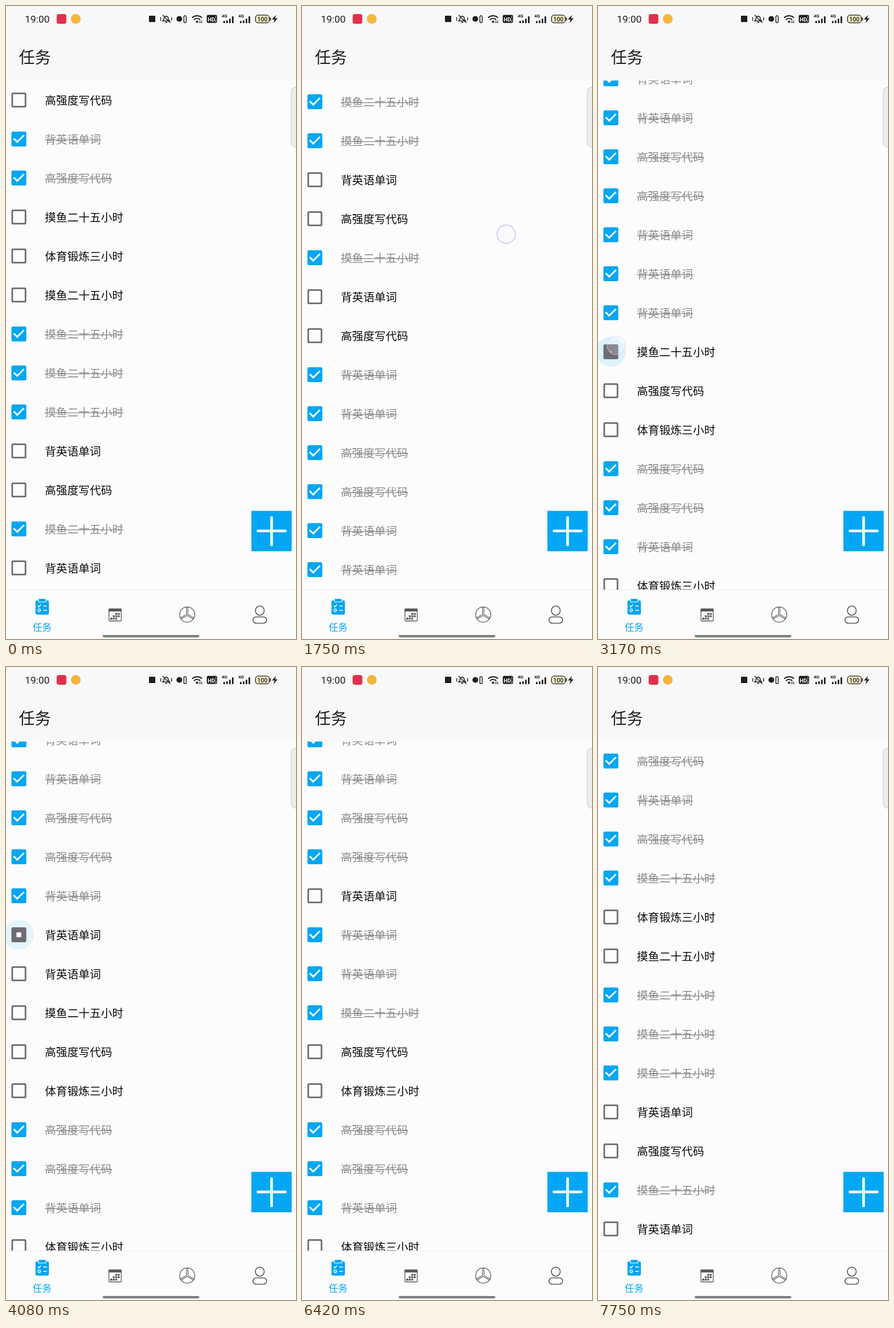
Write an HTML page with a canvas that moves like this. It is 507x1104 px and loops after 8000 ms.

```html
<!DOCTYPE html>
<html lang="zh-CN">
<head>
<meta charset="utf-8">
<style>
html, body { margin: 0; width: 100%; height: 100%; overflow: hidden; background: #fcfcfc; }
canvas { display: block; width: 507px; height: 1104px; }
</style>
</head>
<body>
<canvas id="stage"></canvas>
<script>
const W = 507, H = 1104, LOOP = 8000, STEP = LOOP / 96;
const BLUE = '#03a6f3', GRAY = '#6d6b74', INK = '#1d1d20', PAGE = '#fcfcfc', HEAD = '#f8f8f8';
const CJK = '"Noto Sans CJK SC", "Noto Sans CJK", sans-serif';
const LIST_TOP = 130, LIST_END = 1018, FIRST = 164, PITCH = 68, FAR = 989;

const canvas = document.getElementById('stage');
const ctx = canvas.getContext('2d');
const dpr = window.devicePixelRatio || 1;
canvas.width = W * dpr;
canvas.height = H * dpr;

const LABEL = { 高: '高强度写代码', 背: '背英语单词', 摸: '摸鱼二十五小时', 体: '体育锻炼三小时' };
const DONE = '0110001110010011111111001110';
const items = [...'高背高摸体摸摸摸摸背高摸背高背背高高背背背摸高体高高背体']
  .map((key, i) => ({ text: LABEL[key], done: DONE[i] === '1' }));

// Each tap: row, step at which the finger lands, finger position relative to the box
const taps = [
  [0, 1, 12, 4], [3, 6, 10, -2],
  [21, 36, 9, -11], [20, 41, 12, -4], [19, 46, 14, 2], [18, 51, 14, 4],
  [19, 61, 19, 9], [20, 66, 17, 5], [21, 71, 15, 2]
].map(([row, step, dx, dy]) => ({ row, at: step * STEP, dx, dy }));
const PRESS = STEP;

const clamp = v => Math.max(0, Math.min(1, v));

function scrollAt(t) {
  if (t < 1750) return 473 * clamp((t - 1333) / 417) ** 1.6;
  if (t < 6480) return 473 + (FAR - 473) * (1 - (1 - clamp((t - 1750) / 1150)) ** 4.2);
  if (t <= 7000) return FAR - 891 * clamp((t - 6480) / 520) ** 1.35;
  return 98 * (1 - clamp((t - 7000) / 80));
}

function box(x, y, w, h, r, fill, stroke, lw = 1) {
  ctx.beginPath();
  ctx.roundRect(x, y, w, h, r);
  if (fill) { ctx.fillStyle = fill; ctx.fill(); }
  if (stroke) { ctx.strokeStyle = stroke; ctx.lineWidth = lw; ctx.stroke(); }
}

function disc(x, y, r, fill, stroke, lw = 1) {
  ctx.beginPath();
  ctx.arc(x, y, r, 0, 7);
  if (fill) { ctx.fillStyle = fill; ctx.fill(); }
  if (stroke) { ctx.strokeStyle = stroke; ctx.lineWidth = lw; ctx.stroke(); }
}

function line(d, color, lw, cap = 'butt') {
  ctx.strokeStyle = color;
  ctx.lineWidth = lw;
  ctx.lineCap = cap;
  ctx.stroke(new Path2D(d));
}

function shape(d, color) {
  ctx.fillStyle = color;
  ctx.fill(new Path2D(d));
}

function label(s, x, y, font, color, align = 'left') {
  ctx.font = font;
  ctx.fillStyle = color;
  ctx.textAlign = align;
  ctx.fillText(s, x, y);
}

// hole: 0 to 1 opening of the gray frame; tick: 0 to 1 size of the check mark
function checkbox(y, hole, tick) {
  ctx.save();
  ctx.translate(22.5, y);
  box(-13, -13, 26, 26, 2.8, tick > 0 ? BLUE : GRAY);
  if (tick > 0) {
    ctx.scale(tick, tick);
    line('M-9 -1L-2.9 5.1L9 -6.7', '#fff', 2.9);
  } else {
    const s = 2 + 18.4 * hole;
    box(-s / 2, -s / 2, s, s, 1, PAGE);
  }
  ctx.restore();
}

function drawRow(i, y, t) {
  let { text, done } = items[i], flip = -Infinity;
  for (const tap of taps) {
    if (tap.row !== i) continue;
    const age = t - tap.at;
    if (age >= PRESS - 1) { done = !done; flip = tap.at + PRESS; }
    if (age > 1 && age < 470) {
      const fade = 1 - clamp((age - 2 * STEP) / 300);
      disc(22.5, y, 26 * (0.4 + 0.6 * clamp(age / 160)), `rgba(3,166,243,${0.13 * fade})`);
    }
  }
  const k = clamp((t - flip) / 330);
  if (done) k < 0.3 ? checkbox(y, 1 - k / 0.3, 0) : checkbox(y, 0, clamp((k - 0.1) / 0.75));
  else k < 0.2 ? checkbox(y, 0, 1) : checkbox(y, clamp((k - 0.26) / 0.7), 0);

  label(text, 68, y + 8, '19.6px ' + CJK, done ? '#8a8a8c' : '#0b0b0c');
  if (done) {
    ctx.fillStyle = '#858587';
    ctx.fillRect(68, y + 1, ctx.measureText(text).width, 1.2);
  }
}

function drawList(t) {
  const scroll = scrollAt(t);
  ctx.save();
  ctx.beginPath();
  ctx.rect(0, LIST_TOP, W, LIST_END - LIST_TOP);
  ctx.clip();
  items.forEach((_, i) => {
    const y = FIRST + i * PITCH - scroll;
    if (y > 95 && y < 1050) drawRow(i, y, t);
  });
  ctx.restore();
}

function signal(x) {
  label('4G', x - 3, 20, 'bold 8px Roboto, sans-serif', INK);
  [4, 5, 8, 12].forEach((h, i) => box(x + i * 5, 30 - h, 2.8, h, 1, INK));
}

function drawStatus() {
  label('19:00', 33, 29, '17.4px Roboto, sans-serif', INK);
  box(88.5, 14, 17, 17, 4, '#e0314c');
  disc(122, 22.5, 8.5, '#f4b53f');

  box(250, 17, 11, 11, 0, INK);

  line('M274 26H286Q283.500 24 283.500 20.500A3.700 4 0 0 0 276.500 20.500Q276.500 24 274 26ZM278.500 28.500H281.500M274 16L287 29', INK, 1.5, 'round');
  line('M270.500 20V25M289.500 20V25', INK, 1.4, 'round');

  disc(303, 22.5, 5, INK);
  box(311, 17, 4, 12, 1.5, null, INK, 1.4);

  line('M326 20A12 12 0 0 1 342 20M329 23.500A7.500 7.500 0 0 1 339 23.500', INK, 1.9, 'round');
  disc(334, 27.5, 2, INK);
  line('M339 25.500V30M342 25.500V30', INK, 1.2);

  box(351, 15.5, 18, 14, 2.5, INK);
  label('HD', 352.5, 26.5, 'bold 9.5px Roboto, sans-serif', '#fff');
  label('1', 365.2, 22, 'bold 5px Roboto, sans-serif', '#fff');
  label('2', 365.2, 28, 'bold 5px Roboto, sans-serif', '#fff');

  signal(380);
  signal(409);

  box(436.3, 15.8, 24, 13.6, 4.5, '#f5ecc4', INK, 1.3);
  box(461.4, 20, 1.8, 5.2, 1, INK);
  label('100', 448.3, 26.6, '500 10.5px Roboto, sans-serif', INK, 'center');
  shape('M472 15.500L465 23.500H469.500L467.500 30L475 21.500H470.500Z', INK);
}

function drawHeader() {
  ctx.fillStyle = HEAD;
  ctx.fillRect(0, 0, W, LIST_TOP);
  drawStatus();
  label('任务', 22.5, 99.5, '500 28px ' + CJK, INK);
}

function drawOverlay() {
  box(499, 141.5, 20, 104.5, 7, '#ededed', '#c9c9cb');
  ctx.fillStyle = BLUE;
  ctx.fillRect(429, 880.5, 70.5, 70.5);
  line('M440.500 915.500H488.500M464.300 892V940', '#fff', 4.6, 'round');
}

function drawNav() {
  ctx.fillStyle = PAGE;
  ctx.fillRect(0, LIST_END, W, H - LIST_END);
  ctx.fillStyle = '#eeeeef';
  ctx.fillRect(0, LIST_END, W, 1);

  // Clipboard
  box(51.5, 1036.5, 23.5, 25, 3, BLUE);
  box(56.5, 1033.5, 13.5, 6, 2, BLUE, PAGE, 1.2);
  line('M55.500 1046L57.500 1048L61 1044M65 1046.500H71.500M65 1054H71.500', '#fff', 1.6);
  disc(58.2, 1054, 2.2, null, '#fff', 1.5);
  label('任务', 63, 1090, '16.6px ' + CJK, BLUE, 'center');

  // Calendar
  const ink = '#59595d';
  box(180, 1051.5, 21.5, 21, 1, null, ink, 1.3);
  ctx.fillStyle = ink;
  ctx.fillRect(179.5, 1051, 22.5, 5);
  for (let r = 0; r < 3; r++)
    for (let c = 0; c < 4; c++)
      if (r + c > 1 && !(r === 2 && c === 3)) ctx.fillRect(182.5 + c * 4.3, 1058.5 + r * 4.2, 3.3, 3.2);
  ctx.fillRect(182.5, 1066.9, 3.3, 3.2);

  // Pie
  disc(316.8, 1061.5, 13.3, null, ink, 1.3);
  line('M315.600 1048.200V1061L304.700 1067.500M318 1048.200V1061L329 1067.500M305.800 1069.300L316.800 1063L327.800 1069.300', ink, 1.1);

  // Person
  ctx.beginPath();
  ctx.ellipse(443.7, 1054.5, 7.7, 8, 0, 0, 7);
  ctx.strokeStyle = ink;
  ctx.lineWidth = 1.6;
  ctx.stroke();
  box(431.8, 1065.5, 23.8, 11, 5.5, null, ink, 1.6);

  box(169, 1097, 169, 4.2, 2.1, '#7f7f81');
}

function finger(x, y, alpha) {
  ctx.globalAlpha = alpha;
  disc(x, y, 16, 'rgba(246,246,255,.55)', '#cfcff0', 1.8);
  ctx.globalAlpha = 1;
}

function drawFinger(t) {
  const scroll = scrollAt(t);
  for (const tap of taps) {
    const age = t - tap.at;
    if (age < -1 || age > 2.5 * STEP) continue;
    finger(22.5 + tap.dx, FIRST + tap.row * PITCH - scroll + tap.dy, age > 1.5 * STEP ? 0.4 : 1);
  }
  if (t > 1325 && t < 1880) finger(340 + 17 * clamp((t - 1333) / 417), 871 - scroll, t > 1800 ? 0.5 : 1);
  if (t > 6450 && t < 7050) finger(330 - 14 * clamp((t - 6480) / 520), 1194 - scroll, 1);
}

function draw(t) {
  ctx.setTransform(dpr, 0, 0, dpr, 0, 0);
  ctx.fillStyle = PAGE;
  ctx.fillRect(0, 0, W, H);
  drawList(t);
  drawHeader();
  drawOverlay();
  drawNav();
  drawFinger(t);
}

const start = performance.now();
function tick() {
  const ms = (performance.now() - start) % LOOP;
  draw(Math.floor(ms / STEP + 0.05) % 96 * STEP);
  requestAnimationFrame(tick);
}
tick();
</script>
</body>
</html>
```
